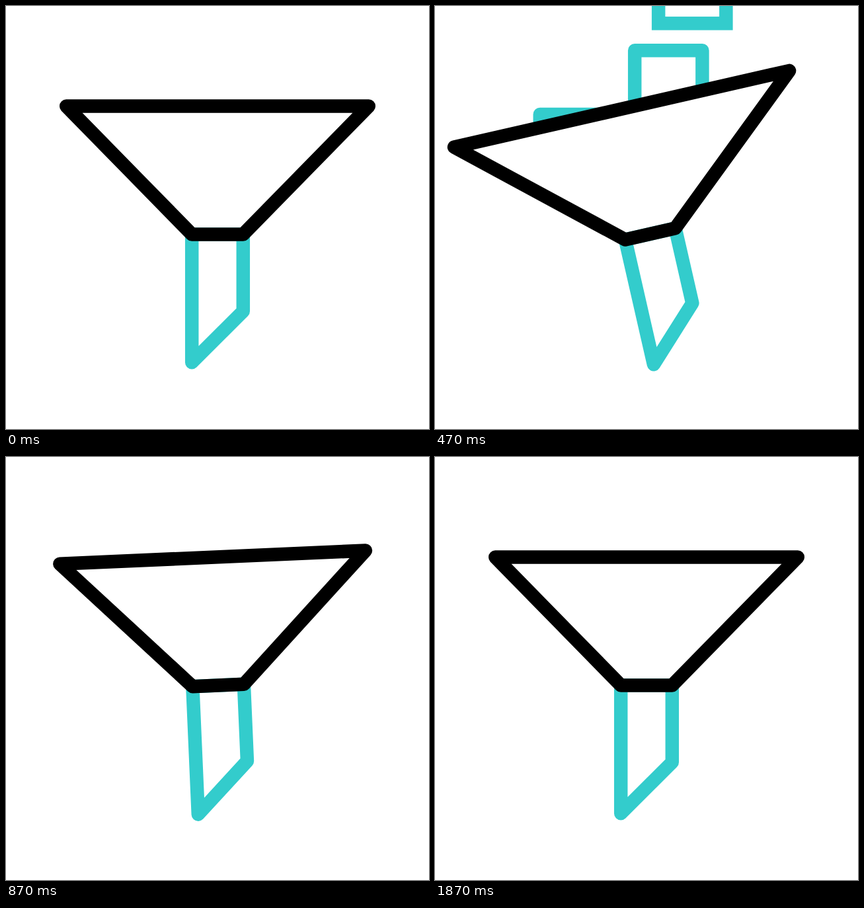
Animation, 640 px wide and 640 px high, one loop 2 s. Source, as an HTML page:

```html
<!DOCTYPE html>
<html lang="en">
<head>
<meta charset="utf-8">
<title>Funnel</title>
<style>
  html, body { margin: 0; width: 100%; height: 100%; overflow: hidden; background: #fff; }
  svg { display: block; width: 100%; height: 100%; }
  .line { fill: none; stroke-width: 20.5; stroke-linejoin: round; }
  .teal { stroke: #33cccc; }
  .black { stroke: #000; }
  .sharp { stroke-linejoin: miter; }
</style>
</head>
<body>
<svg viewBox="0 0 640 640">
  <rect class="line teal square" x="158.75" y="-200" width="102.2" height="102.2"/>
  <rect class="line teal square" x="302.2" y="-200" width="102.2" height="102.2"/>
  <rect class="line teal square sharp" x="338.15" y="-200" width="102.2" height="102.2"/>
  <g id="funnel">
    <!-- hides squares once they drop past the rim -->
    <rect x="-400" y="151.5" width="1440" height="1200" fill="#fff"/>
    <path id="stem" class="line teal"/>
    <path id="cone" class="line black"/>
  </g>
</svg>
<script>
  const LOOP = 2000, FPS = 30;
  const $ = id => document.getElementById(id);
  const squares = document.querySelectorAll('.square');
  const delays = [0, 2.47, 7.72];

  // Keys are [frame, value] pairs, eased in and out between neighbours.
  const tilt = [[0, 0], [13, -13.9], [21, 10.6], [26, -2.5], [29, 0]];
  const flare = [[0, 0], [8.4, 48.3], [11, 48.3], [17.5, 9.8], [21, 29.5], [26, 2.7], [29, 0]];
  const stretch = [[33, 0], [45, 48], [49.5, 50], [56, 0]];

  function ease(keys, f) {
    if (f <= keys[0][0]) return keys[0][1];
    for (let i = 1; i < keys.length; i++) {
      const [a, from] = keys[i - 1], [b, to] = keys[i];
      if (f < b) {
        const s = (f - a) / (b - a);
        return from + (to - from) * s * s * (3 - 2 * s);
      }
    }
    return keys[keys.length - 1][1];
  }

  const polygon = points => 'M' + points.map(p => p.join(' ')).join('L') + 'Z';

  function draw(time) {
    const f = Math.floor((time % LOOP + 4) * FPS / 1000) % 60;

    squares.forEach((square, i) => {
      const t = Math.max(0, f - delays[i]);
      square.setAttribute('y', -136.3 + 1.532 * t * t);
    });

    const half = 228.8 + ease(flare, f);
    const drop = ease(stretch, f);
    const lean = drop * 0.017;
    $('funnel').setAttribute('transform', `rotate(${ease(tilt, f)} 320 320)`);
    $('cone').setAttribute('d', polygon([
      [320 - half, 151.5], [320 + half, 151.5], [358.8, 345.5], [281.2, 345.5]
    ]));
    $('stem').setAttribute('d', polygon([
      [281.2, 345.5], [281.2 - lean, 539.2 + drop],
      [358.8 - lean, 461.8 + drop], [358.8, 345.5]
    ]));
  }

  const start = performance.now();
  function tick() {
    draw(performance.now() - start);
    requestAnimationFrame(tick);
  }
  tick();
</script>
</body>
</html>
```
